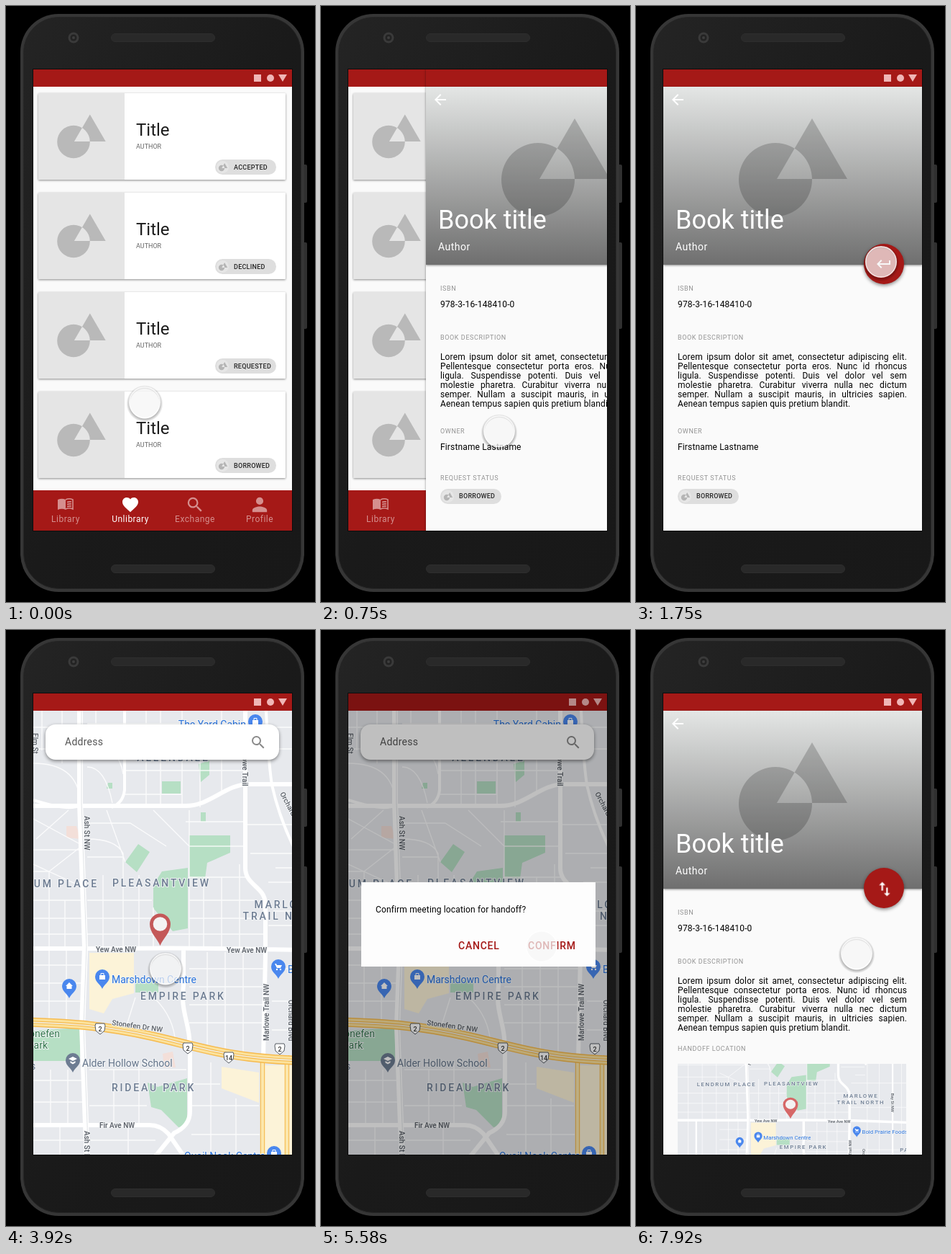
Write an HTML page that moves like this. It is 430 by 827 pixels and loops after 8 s.

```html
<!DOCTYPE html>
<html lang="en">
<head>
<meta charset="utf-8">
<title>Book handoff</title>
<style>
  html, body { margin: 0; width: 100%; height: 100%; overflow: hidden; background: #000; }
  body { position: relative; font-family: Roboto, sans-serif; }
  svg { display: block; position: absolute; left: 0; top: 0; }
  #screen { position: absolute; left: 38px; top: 88px; width: 360px; height: 640px; overflow: hidden; background: #fafafa; }
  .page { position: absolute; inset: 0; }
  #detail { background: #fafafa; box-shadow: 0 0 3px rgba(0,0,0,.45); }

  .red { fill: #a51917; }
  .lift { filter: drop-shadow(0 1px 1.5px rgba(0,0,0,.45)); }
  .float { filter: drop-shadow(0 2px 2.5px rgba(0,0,0,.45)); }
  .title { font-size: 24px; fill: #1c1c1c; }
  .by { font-size: 9px; fill: #666; }
  .tag { font-size: 9px; font-weight: 500; letter-spacing: .25px; fill: #262626; }
  .nav { font-size: 12px; letter-spacing: .5px; text-anchor: middle; }
  .cap { font-size: 9px; letter-spacing: .6px; fill: #929292; }
  .body, p { font-size: 12px; letter-spacing: .15px; fill: #000; color: #000; }
  .button { font-size: 14px; font-weight: 500; letter-spacing: .75px; }
  p { position: absolute; left: 20px; top: 393.4px; width: 319px; margin: 0; line-height: 13px; }
  p span { display: block; text-align-last: justify; }
  p span:last-child { text-align-last: left; }

  .area { font-size: 14px; font-weight: 500; letter-spacing: 2.8px; fill: #6d7c92; }
  .street { font-size: 10px; font-weight: 500; fill: #5b6068; }
  .place { font-size: 14px; fill: #2a73dc; }
  .area, .street, .place { paint-order: stroke; stroke: #f1f3f5; stroke-width: 2px; }
  .road { fill: none; stroke: #fff; stroke-linejoin: round; }

  .timed { animation: 8s step-end -5ms infinite; }
  #detail { animation-name: slide; }
  #before { animation-name: before; }
  #after { animation-name: after; }
  #mapPage { animation-name: map; }
  #dialog { animation-name: dialog; }
  #finger { animation-name: finger; }
  #fingerShadow { animation-name: pressed; }

  @keyframes slide {
    0% { transform: translateX(370px); }
    8.3333% { transform: translateX(228px); }
    9.375% { transform: translateX(108px); }
    10.4167% { transform: translateX(24px); }
    11.4583%, 100% { transform: none; }
  }
  @keyframes before { 0% { opacity: 1; } 85.4167%, 100% { opacity: 0; } }
  @keyframes after { 0% { opacity: 0; } 85.4167%, 100% { opacity: 1; } }
  @keyframes map { 0% { opacity: 0; } 48.9583% { opacity: 1; } 85.4167%, 100% { opacity: 0; } }
  @keyframes dialog { 0% { opacity: 0; } 69.7917% { opacity: 1; } 85.4167%, 100% { opacity: 0; } }
  @keyframes pressed { 0% { opacity: 1; } 69.7917% { opacity: 0; } 85.4167%, 100% { opacity: 1; } }
  @keyframes finger {
    0% { transform: translate(193px, 550px); animation-timing-function: steps(9); }
    9.375% { transform: translate(248px, 590px); }
    12.5% { transform: translate(248px, 590px); animation-timing-function: steps(9); }
    21.875% { transform: translate(341px, 355px); }
    48.9583% { transform: translate(222px, 470px); animation-timing-function: steps(3); }
    52.0833% { transform: translate(217px, 444px); }
    69.7917% { transform: translate(307px, 439px); }
    85.4167% { transform: translate(308px, 441px); }
    91.6667% { transform: translate(323px, 396px); }
    93.75% { transform: translate(331px, 386px); }
    94.7917% { transform: translate(339px, 376px); }
    96.875% { transform: translate(331px, 396px); }
    97.9167% { transform: translate(318px, 425px); }
    98.9583%, 100% { transform: translate(307px, 449px); }
  }
</style>
</head>
<body>

<!-- Phone and shared shapes -->
<svg width="430" height="827">
  <defs>
    <linearGradient id="shell" x2="1" y2="1"><stop stop-color="#242424"/><stop offset=".5" stop-color="#1a1a1a"/><stop offset="1" stop-color="#181818"/></linearGradient>
    <linearGradient id="cover" x2="0" y2="1"><stop stop-color="#e4e6e5"/><stop offset="1" stop-color="#6f6f6f"/></linearGradient>
    <radialGradient id="ringShadow"><stop offset=".79" stop-opacity="0"/><stop offset=".83" stop-opacity=".28"/><stop offset="1" stop-opacity="0"/></radialGradient>
    <path id="art" fill-rule="evenodd" d="M-51 0a51 51 0 1 0 102 0a51 51 0 1 0-102 0zM51-85L100-1H2z"/>
    <g id="chip">
      <rect width="85" height="21" rx="10.5" fill="#dedede"/>
      <circle cx="10.5" cy="10.5" r="8.5" fill="#e6e6e6"/>
      <use href="#art" transform="translate(9 12) scale(.082)" fill="#b5b5b5"/>
    </g>
    <g id="status">
      <rect class="red" x="38" y="88" width="360" height="24"/>
      <g fill="#f0b6b6"><path d="M345 95h10v10h-10zM379 95h12l-6 10z"/><circle cx="368" cy="100" r="5"/></g>
    </g>
    <path id="heart" d="M12 21.35l-1.45-1.32C5.4 15.36 2 12.28 2 8.5 2 5.42 4.42 3 7.5 3c1.74 0 3.41.81 4.5 2.09C13.09 3.81 14.76 3 16.5 3 19.58 3 22 5.42 22 8.5c0 3.78-3.4 6.86-8.55 11.54z"/>
    <path id="search" d="M15.5 14h-.79l-.28-.27A6.47 6.47 0 0 0 16 9.5 6.5 6.5 0 1 0 9.5 16c1.61 0 3.09-.59 4.23-1.57l.27.28v.79l5 4.99L20.49 19zm-6 0a4.5 4.5 0 1 1 0-9 4.5 4.5 0 0 1 0 9z"/>
    <path id="person" d="M12 12a4 4 0 1 0 0-8 4 4 0 0 0 0 8zm0 2c-2.67 0-8 1.34-8 4v2h16v-2c0-2.66-5.33-4-8-4z"/>
    <g id="book">
      <path d="M1 5q6-2.5 11 0v14q-5-2.5-11 0z"/>
      <path d="M12 5q5-2.5 10 0v13q-5-2.5-10 0M14 8.5q3-1 6-.5M14 11.5q3-1 6-.5M14 14.5q3-1 6-.5" fill="none" stroke="currentColor" stroke-width="1.6"/>
    </g>
    <path id="back" d="M20 11H7.83l5.59-5.59L12 4l-8 8 8 8 1.41-1.41L7.83 13H20z"/>
    <path id="return" d="M19 7v4H5.83l3.58-3.59L8 6l-6 6 6 6 1.41-1.41L5.83 13H21V7z"/>
    <path id="swap" d="M16 17V10h-2v7h-3l4 4 4-4zM9 3L5 7h3v7h2V7h3z"/>
    <g id="pin">
      <path d="M0 0C-4-10-14.5-18-14.5-30a14.5 14.5 0 0 1 29 0C14.5-18 4-10 0 0z"/>
      <circle cy="-30" r="9.8" fill="#f4f2f2"/>
    </g>
    <path id="poi" d="M0 17C-2 11-10 8-10 0a10 10 0 0 1 20 0C10 8 2 11 0 17z"/>

    <g id="map">
      <path fill="#e7e9ed" d="M-70 100h580v640h-580z"/>
      <path fill="#b6dfc4" d="M255 285h57v24l-32 14-3 22-22-2zM217 335l36-5v84l-21 4-27-32v-32zM184 297l16 11-18 28-16-14zM217 210h26v17h-26zM268 186l15-5v20l-12 10zM271 253h7v13h-7zM142 212h6v8h-8zM38 556l65-4v46H38zM197 628l14 6 41-12v66l-12 2-24-24-14-4zM180 486h32v17h-32z"/>
      <path fill="#fcf3d8" d="M116 448h62v56l-30 8-12 20-20-6zM300 606l52 8v42l-52-20zM360 604h38v130h-38z"/>
      <path fill="#f3dfd9" d="M84 272h14l6 18-20-2zM218 588l14-3 4 22h-16z"/>

      <g class="road" stroke-width="1.3" opacity=".85">
        <path d="M165 130h168M165 150h168M165 195h168M165 228h80M195 112v134M215 112v134M245 112v134M270 150v96M300 112v115"/>
        <path d="M250 266h83M255 300h78M255 343h80M255 375h95M255 400h105M275 343v100M300 343v100M325 325v118M255 250v193M333 270h65M340 310h58"/>
        <path d="M113 268h60l50 32M113 290q40 0 50 20v133M113 315h50M113 375h90M113 400h95M113 422h250M135 340v103M185 340v103M205 385v58M205 250l50 50M140 250l26 72"/>
        <path d="M-66 305H105M-66 335H60L105 300M-66 375H108M-66 400H108M-66 422H108M-40 302v230M-5 302v230M30 302v230M60 335v105M82 375v68"/>
        <path d="M38 135h62M38 165h62M38 185q60 0 65 50M50 112v55M78 112v73M113 130h50M113 160q45 0 50 40M113 190q25 0 35 50M125 112v48M38 262l65 35M42 290l45-40M38 325l65 30"/>
        <path d="M38 465h70M38 490h70M38 515h68M60 443v97M84 443v97M116 610h135M150 610v75M185 600v88M116 660h80M38 625h68M38 655h70M62 610v76M86 610v76M38 708h170M75 687v41M170 687v41"/>
        <path d="M255 470h104M255 495h104M255 520h102M255 545h102M280 447v130M305 447v140M330 447v145M258 630h40M258 660h94M258 700h95M285 600v128M320 650v78M370 470h140M370 515h140M405 300v240M435 300v240M490 300v240M365 350h145M365 410h145"/>
        <path d="M200 505q30 25 35 60M180 510l-12 38M370 135h28M370 165h28M375 330h25M372 390h28M370 555h30"/>
      </g>
      <g class="road" stroke-width="4">
        <path d="M165 112v110q-2 18-18 24M38 236q50 16 65 7M362 112q3 70 8 103 10 45 32 90M468 300v240M-20 443v100"/>
      </g>
      <g class="road" stroke-width="6">
        <path d="M-66 244H250c35 0 55-30 88-30h70M-66 442H150q200-2 360 6M333 112V330c0 25 27 25 28 50v70l-3 145M247 443v50c-5 40 10 50 9 95v80q0 20-22 30l-26 32M38 687H200q15 0 26 12l22 32"/>
      </g>
      <path class="road" stroke-width="8" d="M103 100v140l7 200-4 110 7 190"/>
      <path d="M105 100v140l7 200-4 110 7 190" fill="none" stroke="#d9dce0" stroke-width=".8"/>
      <g fill="none">
        <path id="avenues" d="M357 590v150M391 590v150" stroke="#f6bf58" stroke-width="6.5"/>
        <path d="M357 590v150M391 590v150" stroke="#fce7ac" stroke-width="4"/>
        <g stroke="#f6bb4f" stroke-width="13"><path id="highway" d="M30 544C90 546 140 549 205 564S310 594 400 597"/></g>
        <path d="M30 544C90 546 140 549 205 564S310 594 400 597" stroke="#fce29c" stroke-width="10"/>
        <path d="M30 544C90 546 140 549 205 564S310 594 400 597" stroke="#f6bb4f" stroke-width="4"/>
        <path d="M30 544C90 546 140 549 205 564S310 594 400 597" stroke="#f3ecd9" stroke-width="1.8"/>
      </g>

      <g id="mapText"></g>
    </g>
  </defs>

  <rect x="413" y="220" width="6" height="53" rx="2" fill="#303030"/>
  <rect x="413" y="328" width="6" height="120" rx="2" fill="#303030"/>
  <rect x="20" y="11" width="395" height="802" rx="53" fill="#363636"/>
  <rect x="24.5" y="15.500" width="386" height="793" rx="49" fill="url(#shell)" stroke="#262626"/>
  <g fill="#292929" stroke="#2e2e2e">
    <rect x="146.5" y="38.5" width="144" height="11" rx="5.5"/>
    <rect x="146.5" y="775.5" width="144" height="11" rx="5.5"/>
  </g>
  <circle cx="94" cy="44" r="7.5" fill="#3a3a3a"/>
  <circle cx="94" cy="44" r="4.500" fill="#232323"/>
  <circle cx="94" cy="44" r="2" fill="#3d3d3d"/>
  <rect x="37.5" y="87.5" width="361" height="641" fill="none" stroke="#0d0d0d"/>
</svg>

<div id="screen">
  <div class="page">
    <svg width="360" height="640" viewBox="38 88 360 640">
      <use href="#status"/>
      <g id="cards"></g>
      <rect class="red" x="38" y="672" width="360" height="56"/>
      <g id="tabs"></g>
    </svg>
  </div>

  <div class="page timed" id="detail">
    <svg width="360" height="640" viewBox="38 88 360 640">
      <use href="#status"/>
      <rect class="lift" x="38" y="112" width="360" height="247" fill="url(#cover)"/>
      <use href="#art" transform="translate(194 241)" opacity=".19"/>
      <g fill="#fff">
        <use href="#back" x="46" y="118"/>
        <text x="55" y="309" font-size="36">Book title</text>
        <text x="55" y="339" font-size="14" letter-spacing=".5">Author</text>
      </g>
      <circle class="red float" cx="345" cy="358" r="28"/>
      <text class="cap" x="58" y="395">ISBN</text>
      <text class="body" x="58" y="418">978-3-16-148410-0</text>
      <text class="cap" x="58" y="463">BOOK DESCRIPTION</text>
      <g id="before" class="timed">
        <use href="#return" x="333" y="346" fill="#fff"/>
        <text class="cap" x="58" y="593">OWNER</text>
        <text class="body" x="58" y="616">Firstname Lastname</text>
        <text class="cap" x="58" y="658">REQUEST STATUS</text>
        <use href="#chip" x="58" y="670"/>
        <text class="tag" x="84" y="683">BORROWED</text>
      </g>
      <g id="after" class="timed">
        <use href="#swap" transform="translate(332.8 346.3) scale(1.1)" fill="#fff"/>
        <text class="cap" x="58" y="584">HANDOFF LOCATION</text>
        <svg x="58" y="602" width="318" height="126" viewBox="58 602 318 126">
          <use href="#map" transform="translate(95 432.7) scale(.56)"/>
          <use href="#pin" transform="translate(215 678) scale(.72 .66)" fill="#d66767"/>
        </svg>
      </g>
    </svg>
    <p><span>Lorem ipsum dolor sit amet, consectetur adipiscing elit.</span><span>Pellentesque consectetur porta eros. Nunc id rhoncus</span><span>ligula. Suspendisse potenti. Duis vel dolor vel sem</span><span>molestie pharetra. Curabitur viverra nulla nec dictum</span><span>semper. Nullam a suscipit mauris, in ultricies sapien.</span><span>Aenean tempus sapien quis pretium blandit.</span></p>
  </div>

  <div class="page timed" id="mapPage">
    <svg width="360" height="640" viewBox="38 88 360 640">
      <use href="#map"/>
      <use href="#status"/>
      <use href="#pin" transform="translate(214.5 438)" fill="#c45858"/>
      <rect class="float" x="55" y="131" width="325" height="49" rx="14" fill="#fff"/>
      <text x="82" y="160" font-size="14" letter-spacing=".25" fill="#555">Address</text>
      <use href="#search" x="339" y="144" fill="#8a8a8a"/>
      <g id="dialog" class="timed">
        <path d="M38 88h360v640H38z" opacity=".25"/>
        <rect x="56" y="350" width="326" height="117" fill="#fdfdfd"/>
        <text class="body" x="76" y="392">Confirm meeting location for handoff?</text>
        <text class="button red" x="191" y="443">CANCEL</text>
        <text class="button red" x="288" y="443">CONFIRM</text>
      </g>
    </svg>
  </div>

  <svg width="360" height="640" viewBox="38 88 360 640">
    <g id="finger" class="timed">
      <circle id="fingerShadow" class="timed" cy="1.8" r="25.5" fill="url(#ringShadow)"/>
      <circle r="21.3" fill="#f5f5f5" fill-opacity=".72" stroke="#fff" stroke-opacity=".8" stroke-width="1.5"/>
    </g>
  </svg>
</div>

<script>
  const fill = (id, items, draw) => {
    document.getElementById(id).innerHTML = items.map(draw).join('');
  };

  fill('cards', ['ACCEPTED', 'DECLINED', 'REQUESTED', 'BORROWED'], (state, i) => `
    <g transform="translate(0 ${138 * i})">
      <rect class="lift" x="45" y="121" width="344" height="120" rx="1" fill="#fff"/>
      <path d="M45 121h120v120H45z" fill="#e5e5e5"/>
      <use href="#art" transform="translate(94 188.5) scale(.447)" fill="#b9b9b9"/>
      <text class="title" x="181" y="180">Title</text>
      <text class="by" x="181" y="198">AUTHOR</text>
      <use href="#chip" x="291" y="213"/>
      <text class="tag" x="317" y="226.5">${state}</text>
    </g>`);

  fill('tabs', [
    ['book', 'Library', 83, 1], ['heart', 'Unlibrary', 173, 1.1],
    ['search', 'Exchange', 263, 1.14], ['person', 'Profile', 353, 1.27]
  ], ([icon, label, x, size]) => {
    const color = label === 'Unlibrary' ? '#fff' : '#d58f8e';
    return `<g fill="${color}" color="${color}">
      <use href="#${icon}" transform="translate(${x} 692) scale(${size}) translate(-12 -12)"/>
      <text class="nav" x="${x}" y="716">${label}</text></g>`;
  });

  // Each label: class, x, y, text, then an optional turn in degrees and attributes
  const label = ([kind, x, y, text, turn = 0, extra = '']) =>
    `<text class="${kind}" transform="translate(${x} ${y}) rotate(${turn})" ${extra}>${text}</text>`;
  const middle = 'text-anchor="middle"', end = 'text-anchor="end"';
  const gray = 'style="fill:#64748a"', green = 'style="fill:#34794e"';
  const labels = [
    ['area', 148, 356, 'PLEASANTVIEW'], ['area', 187, 513, 'EMPIRE PARK'],
    ['area', 147, 640, 'RIDEAU PARK'], ['area', 129, 357, 'LENDRUM PLACE', 0, end],
    ['area', 233, 182, 'ALLENDALE', 0, middle], ['area', 389, 386, 'MARLOWE', 0, middle],
    ['area', 389, 402, 'TRAIL NORTH', 0, middle], ['area', 486, 521, 'PAP'],
    ['street', 125, 447, 'Yew Ave NW'], ['street', 307, 448, 'Yew Ave NW'],
    ['street', 109, 258, 'Ash St NW', 90], ['street', 109, 695, 'Ash St NW', 90],
    ['street', 37, 143, 'Elm St', 90], ['street', 329, 156, 'Marlowe Trail', 90],
    ['street', 366, 570, 'Marlowe Trail NW', -90], ['street', 381, 227, 'Orchard Blvd', 62],
    ['street', 393, 513, 'Orchard Blvd', 90], ['street', 147, 548, 'Stonefen Dr NW', 8],
    ['street', 130, 691, 'Fir Ave NW'], ['street', 465, 375, 'Bay St NW', 90],
    ['place', 147, 490, 'Marshdown Centre'], ['place', 334, 136, 'The Yard Cabin', 0, end],
    ['place', 392, 476, 'Bold Prairie Foods'], ['place', 248, 735, 'Quail Nook Centre'],
    ['place', 106, 606, 'Alder Hollow School', 0, gray], ['place', 75, 565, 'Stonefen', 0, `${end} ${green}`],
    ['place', 58, 581, 'Park', 0, `${end} ${green}`], ['place', 34, 610, 's', 0, gray]
  ].map(label).join('');

  const glyphs = {
    bag: '<path d="M-4-2h8v6h-8z"/><path d="M-2-2v-2.5h4v2.5" fill="none" stroke="#fff"/>',
    house: '<path d="M0-5l5 5H3.5v4h-7V0H-5z"/>',
    cart: '<path d="M-5-4h2l1 2h7l-2 4h-5z"/><circle cx="-2" cy="4" r="1.2"/><circle cx="3" cy="4" r="1.2"/>',
    cap: '<path d="M0-5l6 3-6 3-6-3zM-3.5 1L0 3l3.5-2v2.5L0 5.5l-3.5-2z"/>'
  };
  const marker = ([glyph, x, y]) => `<g transform="translate(${x} ${y})">
    <use href="#poi" fill="${glyph === 'cap' ? '#6d7c92' : '#4a87ee'}"/><g fill="#fff">${glyphs[glyph]}</g></g>`;
  const markers = [
    ['bag', 134, 481], ['house', 88, 494], ['cart', 379, 467],
    ['bag', 347, 127], ['bag', 373, 726], ['cap', 93, 597]
  ].map(marker).join('');

  const shield = ([x, y, route]) => `<g transform="translate(${x} ${y})">
    <path d="M-6-7H6l1 3-1 7-6 5-6-5-1-7z" fill="#fff" stroke="#555b63"/>
    <text y="3.5" font-size="9" font-weight="500" fill="#333" ${middle}>${route}</text></g>`;
  const shields = [[131, 553, 2], [253, 580, 2], [310, 593, 14], [381, 581, 2]].map(shield).join('');

  document.getElementById('mapText').innerHTML = labels + markers + shields;
</script>
</body>
</html>
```
